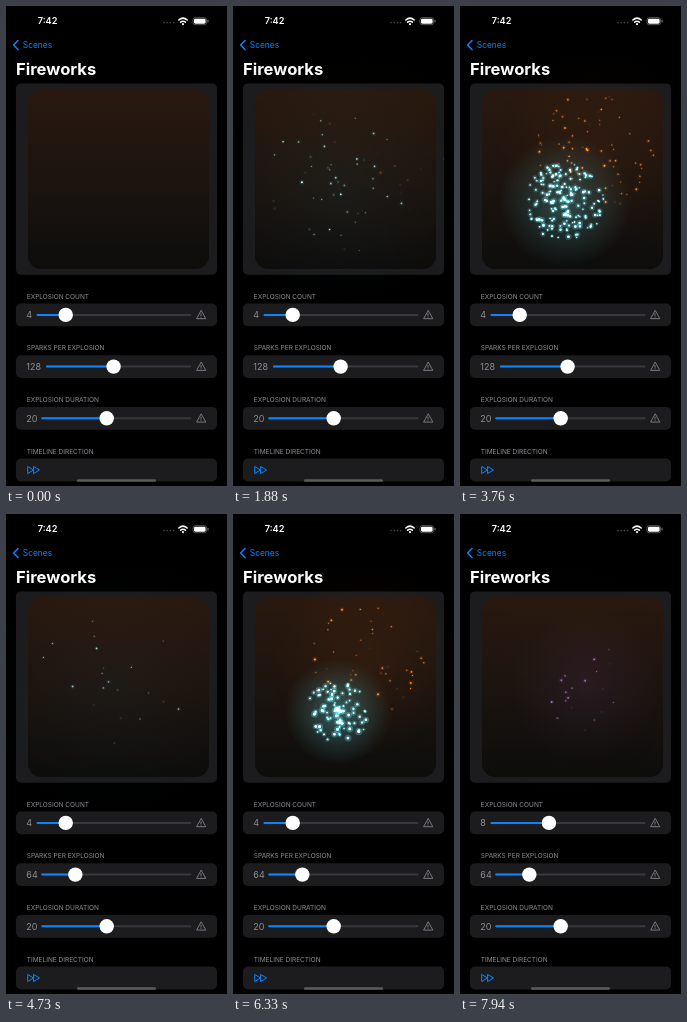
Animation of 221x480 px, one loop 8 s. Source, as an HTML page with a canvas:

```html
<!DOCTYPE html>
<html lang="en">
<head>
<meta charset="utf-8">
<title>Fireworks</title>
<style>
html, body { margin: 0; width: 100%; height: 100%; overflow: hidden; background: #000; }
svg, canvas { position: absolute; left: 0; top: 0; width: 221px; height: 480px; }
text { font-family: Inter, "Liberation Sans", sans-serif; }
.label { font-size: 6.5px; fill: #8d8d93; }
.value { font-size: 9px; fill: #8d8d93; }
.line { fill: none; stroke-linecap: round; stroke-linejoin: round; }
</style>
</head>
<body>
<svg viewBox="0 0 221 480">
  <defs>
    <linearGradient id="sky" x2="0" y2="1">
      <stop offset="0" stop-color="#2a190f"/>
      <stop offset=".5" stop-color="#1c140f"/>
      <stop offset="1" stop-color="#0d0d0c"/>
    </linearGradient>
  </defs>
  <text x="31.7" y="18.3" font-size="9.2" font-weight="600" fill="#fff">7:42</text>
  <path class="line" d="M158 16.6h10" stroke="#48484a" stroke-width="1.6" stroke-dasharray="0 3.2"/>
  <g class="line" stroke="#fff" stroke-width="1.5">
    <path d="M172.8 14q4.2-3.8 8.4 0M174.6 16.2q2.4-2 4.8 0"/>
    <path d="M177 18.1v.1" stroke-width="2"/>
  </g>
  <rect x="187" y="11.7" width="13.6" height="7" rx="2.2" fill="none" stroke="#7c7c7e" stroke-width=".7"/>
  <rect x="188" y="12.7" width="11.6" height="5" rx="1.4" fill="#fff"/>
  <path class="line" d="M202 14.4v1.6" stroke="#7c7c7e"/>
  <path class="line" d="M12 34.6l-4.4 4.5 4.4 4.5" stroke="#0a84ff" stroke-width="1.5"/>
  <text x="16.8" y="42.2" font-size="8.4" fill="#0a84ff">Scenes</text>
  <text x="10" y="68.7" font-size="16.6" font-weight="700" fill="#fff">Fireworks</text>
  <rect x="10" y="77.4" width="201" height="191.4" rx="5" fill="#1c1c1e"/>
  <rect x="22" y="84" width="181" height="179" rx="13" fill="url(#sky)"/>
  <g id="rows"></g>
  <g class="line" stroke="#0a84ff">
    <path d="M21.7 460.8v6.8l5.4-3.4zM27.6 460.8v6.8l5.6-3.4z"/>
  </g>
  <path class="line" d="M72.2 474.5h76.6" stroke="#5c5c5f" stroke-width="2.4"/>
</svg>
<canvas width="221" height="480"></canvas>
<script>
const LOOP = 8000, CYCLES = [150, 2830, 5500];
const $ = s => document.querySelector(s);
const ctx = $('canvas').getContext('2d');

// Settings list
const labels = ['EXPLOSION COUNT', 'SPARKS PER EXPLOSION', 'EXPLOSION DURATION', 'TIMELINE DIRECTION'];
$('#rows').innerHTML = labels.map((label, i) => {
  const y = 297.5 + i * 51.7;
  return `<text class="label" x="20.8" y="${y - 4.8}">${label}</text>
    <rect x="10" y="${y}" width="201" height="22.8" rx="5" fill="#1c1c1e"/>` + (i > 2 ? '' :
    `<g class="slider" transform="translate(0 ${y + 11.4})">
      <text class="value" x="20.3" y="3.3"></text>
      <path class="line track" stroke="#39393d" stroke-width="2"/>
      <path class="line fill" stroke="#0a84ff" stroke-width="2"/>
      <circle r="7.2" fill="#fff"/>
      <path class="line" d="M195-4.2l-4.4 8h8.8zM195-1.2v2.1M195 2.3v.1" stroke="#8d8d93" stroke-width=".8"/>
    </g>`);
}).join('');
const sliders = [...document.querySelectorAll('.slider')];

function setSlider(i, value, fraction) {
  const part = s => sliders[i].querySelector(s);
  const text = String(Math.round(value));
  const start = 26.8 + 4.7 * text.length;
  const x = start + 6.3 + fraction * (176.6 - start - 6.3);
  part('text').textContent = text;
  part('.track').setAttribute('d', `M${start} 0H184.5`);
  part('.fill').setAttribute('d', `M${start} 0H${x}`);
  part('circle').setAttribute('cx', x);
}

// Fireworks
function makeBurst(seed, x, y, reach, drift, life, rgb, core) {
  const rand = () => (seed = seed * 16807 % 2147483647) / 2147483647;
  const sparks = Array.from({ length: 168 }, () => ({
    angle: rand() * Math.PI * 2,
    speed: Math.pow(rand(), .62),
    life: life * (.3 + .7 * rand() ** 2),
    size: .5 + .6 * rand(),
    phase: rand() * 6.28
  }));
  return { x, y, reach, drift, life, rgb, core, sparks };
}
const orange = makeBurst(4711, 134, 144, 65, 4, 2000, '226,104,20', '246,138,48');
const cyan = makeBurst(90210, 105, 201, 72, -20, 1800, '84,184,196', '206,246,250');
const purple = makeBurst(3377, 126, 172, 50, 0, 1150, '176,84,206', '232,160,246');

function dot(x, y, r, color) {
  ctx.fillStyle = color;
  ctx.beginPath();
  ctx.arc(x, y, r, 0, 7);
  ctx.fill();
}

function drawBurst(b, age, count) {
  if (age <= 0 || age > b.life) return;
  const radius = b.reach * Math.pow(age / 1080, .41);
  const cy = b.y + b.drift * age / 1000;
  const heat = Math.exp(-age / 420);

  const glow = ctx.createRadialGradient(b.x, cy, 0, b.x, cy, radius * 1.7);
  glow.addColorStop(0, `rgba(${b.rgb},${.6 * heat})`);
  glow.addColorStop(.5, `rgba(${b.rgb},${.28 * heat})`);
  glow.addColorStop(1, `rgba(${b.rgb},0)`);
  dot(b.x, cy, radius * 1.7, glow);

  for (const s of b.sparks.slice(0, count * 1.3)) {
    if (age > s.life) continue;
    const x = b.x + Math.cos(s.angle) * s.speed * radius;
    const y = cy + Math.sin(s.angle) * s.speed * radius;
    const left = 1 - age / s.life;
    const alpha = Math.min(1, left * 3) * (.82 + .18 * Math.sin(age / 60 + s.phase));
    const r = s.size * (.85 + .7 * heat);
    dot(x, y, r * 2.4, `rgba(${b.rgb},${alpha * (.16 + .25 * heat)})`);
    dot(x, y, r, `rgba(${b.core},${alpha})`);
  }
}

function progress(t, from, to) {
  const k = Math.min(1, Math.max(0, (t - from) / (to - from)));
  return k * k * (3 - 2 * k);
}

function frame(now) {
  const t = now % LOOP;
  const count = 4 + 4 * progress(t, 6900, 7250);
  const sparks = 128 - 64 * progress(t, 4200, 4600);
  setSlider(0, count, (count - 1) / 19);
  setSlider(1, sparks, (sparks - 16) / 240);
  setSlider(2, 20, .434);

  ctx.clearRect(0, 0, 221, 480);
  ctx.globalCompositeOperation = 'lighter';
  for (const start of CYCLES) {
    drawBurst(orange, t - start, sparks);
    drawBurst(cyan, t - start - 690, sparks);
  }
  drawBurst(purple, t - 7130, 64);
  requestAnimationFrame(frame);
}
requestAnimationFrame(frame);
</script>
</body>
</html>
```
